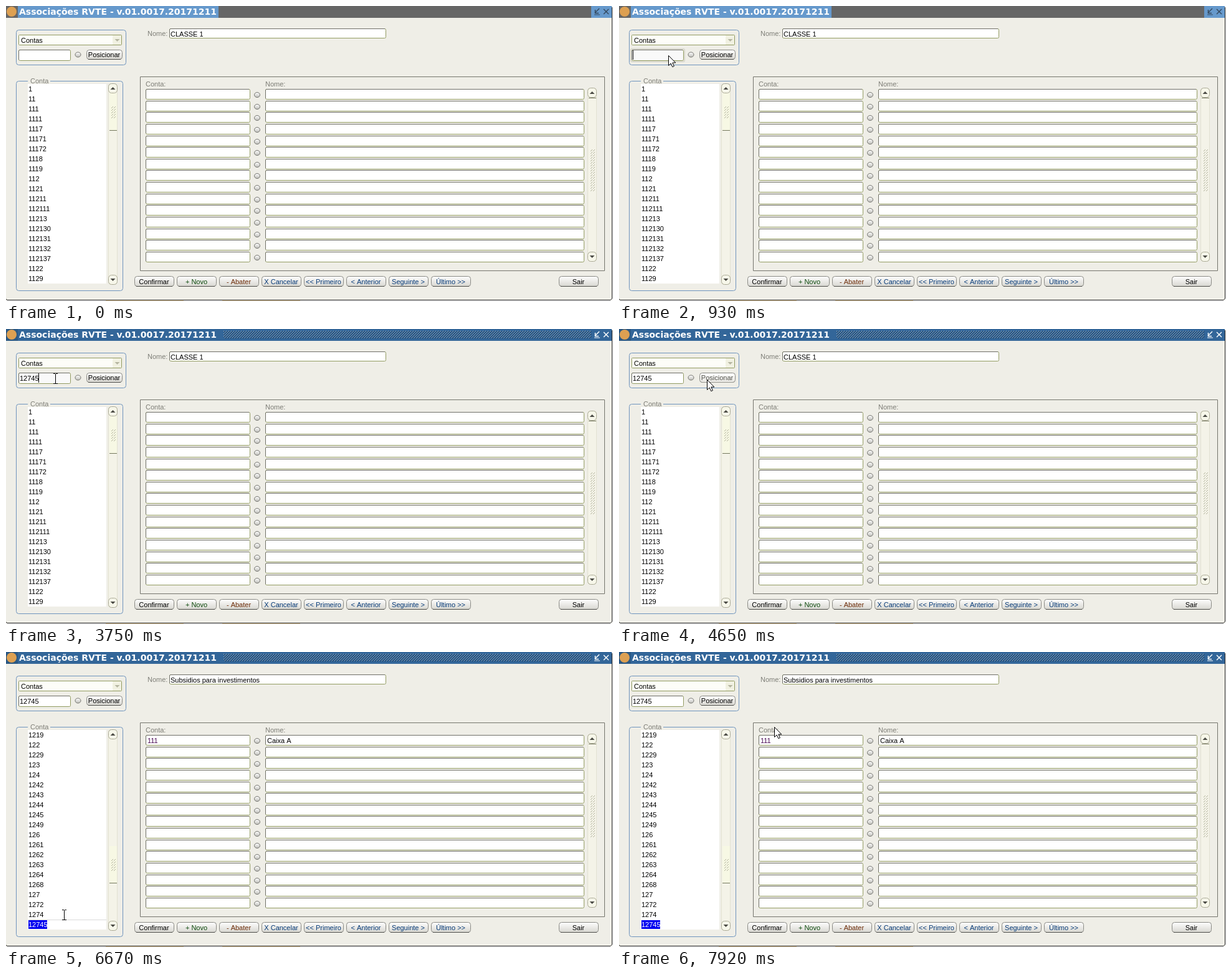
An HTML page with a canvas that plays this animation: 974 px wide and 473 px high, repeating every 8000 ms.

```html
<!DOCTYPE html>
<html lang="pt">
<head>
<meta charset="utf-8">
<style>
  html, body { margin: 0; width: 100%; height: 100%; overflow: hidden; background: #efeee7; }
  canvas { display: block; }
</style>
</head>
<body>
<canvas id="stage" width="974" height="473"></canvas>
<script>
const g = document.getElementById('stage').getContext('2d');
const LOOP = 8000, ACTIVE = 1020, LOADED = 5700;
const OLIVE = '#929b61', GREY = '#6f6f68', BLUE = '#6f94bd', NAVY = '#063a78';

const listBefore = '1 11 111 1111 1117 11171 11172 1118 1119 112 1121 11211 112111 11213 112130 112131 112132 112137 1122 1129'.split(' ');
const listAfter = '1219 122 1229 123 124 1242 1243 1244 1245 1249 126 1261 1262 1263 1264 1268 127 1272 1274 12745'.split(' ');
const keyTimes = [2020, 2330, 2960, 3510, 3750];
const caretOn = [[930, 1560], [2020, 4210], [5000, 5550]];
const buttons = [
  ['Confirmar', '#000'], ['+ Novo', '#0c4a0c'], ['- Abater', '#6b2a06'], ['X Cancelar', NAVY],
  ['<< Primeiro', NAVY], ['< Anterior', NAVY], ['Seguinte >', NAVY], ['Último >>', NAVY]
];

const smooth = u => u * u * (3 - 2 * u);
const moves = [
  { start: 70, end: 860, steps: 12, from: [560, 405], to: [79, 79], ease: smooth },
  { start: 4210, end: 4650, steps: 6, from: [80, 79], to: [141, 81], ease: smooth },
  { start: 6340, end: 6990, steps: 9, from: [141, 81], to: [90, 442], ease: u => 1 - (1 - u) ** 3.5 },
  { start: 7370, end: 7920, steps: 8, from: [90, 442], to: [249, 120], ease: smooth }
];

function pointerAt(t) {
  const m = moves.filter(m => t >= m.start).pop();
  if (!m) return null;
  const k = Math.min(m.steps, 1 + Math.floor((t - m.start) / (m.end - m.start) * (m.steps - 1) + 1e-6));
  const e = m.ease(k / m.steps);
  return [0, 1].map(i => Math.round(m.from[i] + (m.to[i] - m.from[i]) * e));
}

const inside = (p, x, y, w, h) => p && p[0] >= x && p[0] <= x + w && p[1] >= y && p[1] <= y + h;

function box(x, y, w, h, color) {
  g.fillStyle = color;
  g.fillRect(x, y, w, h);
}

function text(s, x, y, color = '#000', align = 'left', font = '11px "Liberation Sans", Arial, sans-serif') {
  g.font = font;
  g.textAlign = align;
  g.fillStyle = color;
  g.fillText(s, x, y);
}

function path(points, stroke, width = 1, fill) {
  g.beginPath();
  points.forEach(([x, y]) => g.lineTo(x, y));
  if (fill) { g.closePath(); g.fillStyle = fill; g.fill(); }
  if (stroke) { g.strokeStyle = stroke; g.lineWidth = width; g.stroke(); }
}

function rounded(x, y, w, h, r, stroke, fill) {
  g.beginPath();
  g.roundRect(x + .5, y + .5, w, h, r);
  if (fill) { g.fillStyle = fill; g.fill(); }
  g.strokeStyle = stroke;
  g.lineWidth = 1;
  g.stroke();
}

function shade(y, h, top, bottom) {
  const s = g.createLinearGradient(0, y, 0, y + h);
  s.addColorStop(0, top);
  s.addColorStop(1, bottom);
  return s;
}

function field(x, y, w, h, hover, ring) {
  if (hover && ring) rounded(x - 2, y - 2, w + 4, h + 4, 2, '#d3d2c6', '#e4e3da');
  rounded(x, y, w, h, 2, OLIVE, hover ? '#f9f9f9' : '#fff');
  path([[x + .5, y + h - 1], [x + .5, y + 1.5], [x + 1.5, y + .5], [x + w - 1, y + .5]], GREY);
}

function button(label, x, y, w, h, color, hover) {
  rounded(x, y, w, h, 4, '#8b8b86', shade(y, h, '#fff', hover ? '#e9e8e3' : '#d9d8d2'));
  path([[x + 3, y + h + .5], [x + w - 2, y + h + .5]], hover ? '#96968f' : '#4c4c49');
  text(label, x + w / 2, y + h - 3, hover ? '#55554f' : color, 'center');
}

function bead(x, y) {
  g.beginPath();
  g.ellipse(x, y, 4.5, 4, 0, 0, 7);
  g.fillStyle = shade(y - 4, 8, '#fff', '#bdbdb8');
  g.fill();
  g.strokeStyle = '#73736e';
  g.lineWidth = 1;
  g.stroke();
}

function triangle(x, y, dir, color = '#4a4a44') {
  path([[x - 4, y + 2 * dir], [x + 4, y + 2 * dir], [x, y - 2 * dir]], null, 1, color);
}

function scrollbar(x, top, bottom, thumbTop, thumbBottom, gripTop, gripBottom) {
  rounded(x, top, 14, bottom - top, 4, '#e3e2d2', '#f4f3e8');
  box(x + 2, thumbTop, 12, thumbBottom - thumbTop, '#f7f8e4');
  path([[x + 2, thumbBottom + .5], [x + 14, thumbBottom + .5]], '#75785e');
  for (let y = gripTop; y < gripBottom; y += 4)
    for (const dx of [0, 4])
      path([[x + 5 + dx, y + 3], [x + 8 + dx, y]], '#b3b49d');
  for (const [y, dir] of [[top, 1], [bottom - 15, -1]]) {
    rounded(x, y, 14, 15, 5, '#aaa995', '#f7f7ea');
    triangle(x + 7.5, y + 8, dir);
  }
}

function titleBar(active) {
  const blue = active ? '#336699' : '#6699cc';
  box(0, 0, 972, 19, blue);
  if (active) {
    for (let row = 0; row < 6; row++)
      for (let x = 349 + row % 2 * 2; x < 938; x += 4) {
        box(x, 3 + row * 2, 1, 1, '#b8bec4');
        box(x + 1, 4 + row * 2, 1, 1, '#14222f');
      }
  } else {
    box(341, 0, 598, 19, '#666');
  }
  box(0, 0, 19, 19, active ? '#2b5883' : '#666');
  g.beginPath();
  g.arc(9, 9, 8, 0, 7);
  g.fillStyle = '#dda052';
  g.fill();
  text('Associações RVTE - v.01.0017.20171211', 21, 14, '#fff', 'left', 'bold 14px "DejaVu Sans", Verdana, sans-serif');
  const ink = active ? '#fff' : '#34495e';
  path([[952, 4], [945, 11]], ink, 1.5);
  path([[945.5, 6], [945.5, 11.5], [951, 11.5]], ink, 1.5);
  path([[944, 14], [953, 14]], ink);
  path([[959, 5], [967, 13]], ink, 1.5);
  path([[967, 5], [959, 13]], ink, 1.5);
}

function searchPanel(t, pointer) {
  rounded(16, 38, 176, 56, 4, BLUE);
  rounded(20, 46, 165, 16, 1, OLIVE, '#fdfdf8');
  box(171, 47, 14, 15, '#f1f1e2');
  triangle(178.5, 55, -1, '#b5b5a0');
  text('Contas', 24, 59);
  field(20, 70, 83, 17, inside(pointer, 20, 70, 83, 17), t < ACTIVE);
  const typed = '12745'.slice(0, keyTimes.filter(k => t >= k).length);
  text(typed, 22, 83);
  if (caretOn.some(([a, b]) => t >= a && t < b)) box(22 + 6 * typed.length, 71, 1, 15, '#000');
  bead(115.5, 78);
  button('Posicionar', 129, 70, 57, 15, '#000', inside(pointer, 129, 70, 57, 15));
}

function accountList(t, pointer, loaded) {
  rounded(16, 120, 171, 336, 4, BLUE);
  box(35, 119, 36, 4, '#efeee7');
  text('Conta', 39, 124, '#7d7d76');
  box(35, 125, 126, 320, '#fff');
  const items = loaded ? listAfter : listBefore;
  if (loaded && t < 6340) box(67, 429, 94, 17, '#f8f8f9');
  items.forEach((item, i) => {
    const y = 137 + 16 * i, selected = item === '12745';
    if (selected) box(36, y - 11, 30, 14, '#0000f0');
    text(item, 36, y, selected ? '#fff' : '#000');
  });
  if (loaded && t > 6340 && inside(pointer, 35, 405, 126, 45)) box(36, 429, 125, 1, '#d9d9d9');
  const top = loaded ? 311 : 140;
  scrollbar(164, 124, 446, top, top + 59, top + 21, top + 40);
}

function detailPanel(pointer, loaded) {
  text('Nome:', 227, 48, '#7d7d76');
  field(262, 36, 347, 15);
  text(loaded ? 'Subsidios para investimentos' : 'CLASSE 1', 264, 49);
  rounded(215, 113, 745, 311, 0, '#74746c');
  text('Conta:', 224, 129, '#7d7d76');
  text('Nome:', 416, 129, '#7d7d76');
  for (let i = 0; i < 15; i++) {
    const y = Math.round(133 + 18.64 * i);
    for (const [x, w] of [[224, 167], [416, 511]])
      field(x, y, w, 16, inside(pointer, x, y, w, 16), true);
    bead(403, y + 9.5);
  }
  if (loaded) {
    text('111', 227, 146, '#4a0a55');
    text('Caixa A', 419, 146);
  }
  scrollbar(933, 131, 409, 147, 147, 230, 297);
}

function drawPointer(t, [x, y], loaded) {
  const p = [x, y];
  if (t >= LOADED && t < 5770) {
    g.beginPath();
    g.arc(140, 79.5, 7, 0, 7);
    g.fillStyle = '#eaf6fd';
    g.fill();
    g.lineWidth = 5;
    g.strokeStyle = '#2a9be2';
    g.stroke();
    g.beginPath();
    g.arc(140, 79.5, 7, 2.4, 4.2);
    g.strokeStyle = '#1474c4';
    g.stroke();
    return;
  }
  const overText = inside(p, 20, 70, 83, 17) || inside(p, 224, 133, 168, 278) ||
    inside(p, 416, 133, 512, 278) || loaded && inside(p, 35, 125, 126, 321);
  if (overText && !(t >= 860 && t < ACTIVE)) {
    box(x, y - 7, 1, 16, '#000');
    for (const dy of [-8, 8]) {
      box(x - 3, y + dy, 3, 1, '#000');
      box(x + 1, y + dy, 3, 1, '#000');
    }
    return;
  }
  const arrow = [[0, 0], [0, 16], [3.7, 12.5], [6.3, 18.2], [8.9, 17], [6.3, 11.5], [11.3, 11.5]];
  path([...arrow, arrow[0]].map(([dx, dy]) => [x + dx + .5, y + dy + .5]), '#000', 1, '#fff');
}

function draw(t) {
  const loaded = t >= LOADED;
  const pointer = pointerAt(t) || (t >= 860 ? [80, 79] : null);
  box(0, 0, 974, 473, '#efeee7');
  titleBar(t >= ACTIVE);
  searchPanel(t, pointer);
  accountList(t, pointer, loaded);
  detailPanel(pointer, loaded);
  buttons.forEach(([label, color], i) => button(label, 206 + 68 * i, 433, 63, 16, color));
  button('Sair', 887, 433, 63, 16, '#000');

  box(973, 0, 1, 473, '#fff');
  box(0, 472, 974, 1, '#fff');
  for (const x of [160, 347]) box(x, 472, 125, 1, '#f6dcae');
  path([[0, 470], [2, 471.5], [970, 471.5], [972.5, 469], [972.5, 2]], '#222');
  if (pointer) drawPointer(t, pointer, loaded);
}

function tick(now) {
  draw(now % LOOP);
  requestAnimationFrame(tick);
}
requestAnimationFrame(tick);
</script>
</body>
</html>
```
